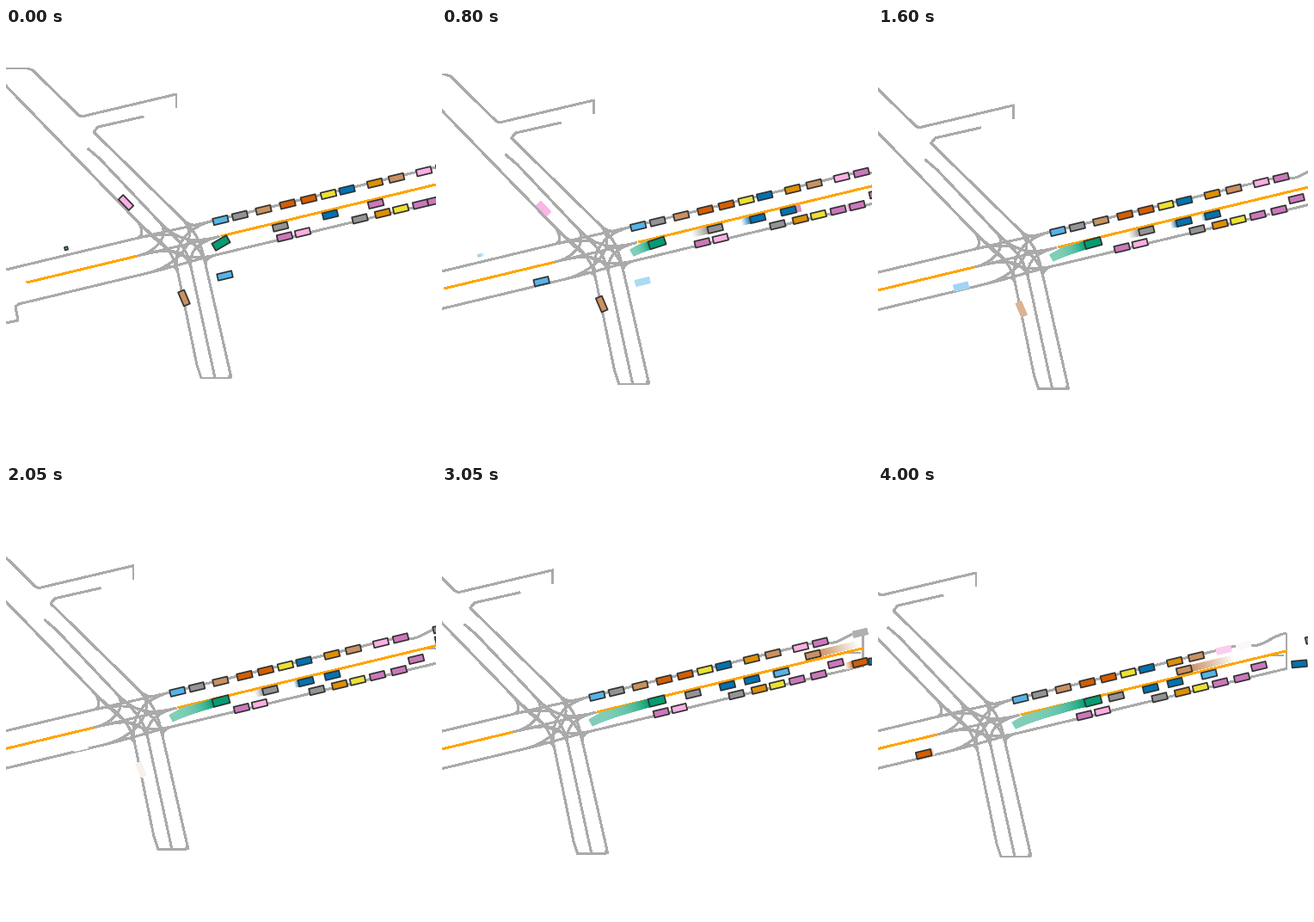
A matplotlib script for the animation above (4.05 s loop, 500 by 500 pixels).

```python
import numpy as np
import matplotlib.pyplot as plt
from matplotlib.animation import FuncAnimation
from matplotlib.collections import LineCollection, PolyCollection
from matplotlib.colors import to_rgb

SIZE, DPI, STEP, FRAMES = 500, 100, 0.05, 81
FADE = 0.8       # seconds until a trail has turned white
SLOPE = -0.24    # rise of the main road
TILT = np.degrees(np.arctan(SLOPE))
EDGE, ROAD, CENTER = "#333333", "#aaaaaa", "#ffa500"

BLUE, ORANGE, GREEN, RED, PURPLE = "#0173b2", "#de8f05", "#029e73", "#d55e00", "#cc78bc"
BROWN, PINK, GRAY, YELLOW, SKY = "#ca9161", "#fbafe4", "#949494", "#ece133", "#56b4e9"

# Lines parallel to the main road, named by their height at x = 400
NORTH, ONCOMING, MIDDLE, SOUTH = 187.4, 199.6, 211.6, 224.6


def on_lane(lane, x):
    return x, lane + SLOPE * (x - 400)


def lane_of(x, y):
    return y - SLOPE * (x - 400)


def stretch(lane, *xs):
    return [on_lane(lane, x) for x in xs]


def camera(t):
    return np.array([28 * t - 1.75 * t**2, -9.4 * t + 0.85 * t**2])


def hero(t):
    return box(camera(t) + 250, -14 - 16 * np.exp(-t / 0.6), (19.3, 9.3))


def box(center, angle, size):
    a = np.radians(angle)
    u = np.array([np.cos(a), np.sin(a)]) * size[0] / 2
    v = np.array([-np.sin(a), np.cos(a)]) * size[1] / 2
    c = np.asarray(center)
    return np.array([c - u - v, c + u - v, c + u + v, c - u + v])


def fade(color, alpha):
    return tuple(1 - alpha * (1 - c) for c in to_rgb(color))


class Car:
    """Rolls along a lane from x to stop, slowing down by the power ease."""

    def __init__(self, color, lane, x, stop=None, start=0, end=9, dur=1, ease=2,
                 angle=TILT, size=(17.4, 7.6)):
        self.color, self.lane, self.x = color, lane, x
        self.stop = x if stop is None else stop
        self.start, self.end, self.dur, self.ease = start, end, dur, ease
        self.angle, self.size = angle, size

    def alive(self, t):
        return self.start - 1e-6 <= t < self.end - 1e-6

    def shape(self, t):
        left = 1 - np.clip((t - self.start) / self.dur, 0, 1)
        x = self.stop + (self.x - self.stop) * left**self.ease
        return box(on_lane(self.lane, x), self.angle, self.size)

    def trail(self, t):
        if self.x == self.stop and self.alive(t):
            return
        for k in range(round(FADE / STEP), 0, -1):
            past = t - k * STEP
            if past >= -1e-6 and self.alive(past):
                yield self.shape(past), fade(self.color, 1 - k * STEP / FADE)


def row(lane, colors, xs):
    return [Car(c, lane, x) for c, x in zip(colors, xs)]


cars = [
    *row(NORTH, [SKY, GRAY, BROWN, RED, RED, YELLOW, BLUE, ORANGE, BROWN],
         [249.5, 272, 299.5, 327.5, 352, 375, 396.5, 429, 454]),
    Car(PINK, NORTH, 486, end=3.75),
    Car(PURPLE, NORTH, 509, end=3.3),
    Car(GRAY, NORTH, 555.5, end=2.9),
    *row(SOUTH, [PURPLE, PINK, GRAY, ORANGE, YELLOW, PURPLE],
         [324, 345, 411.5, 438, 459, 482]),
    Car(PURPLE, SOUTH, 499, 507, dur=2),
    Car(SKY, SOUTH, 137, start=0.8, end=1.3),
    Car(RED, SOUTH, 141, 137, start=3.2),
    Car(BLUE, SOUTH, 574, start=3, angle=-5),
    Car(GRAY, MIDDLE, 319, 361, dur=2.9),
    Car(BLUE, MIDDLE, 377, 401, dur=2.9),
    Car(PURPLE, MIDDLE, 430, end=0.7),
    Car(BLUE, MIDDLE, 423, 429.5, start=0.7),
    Car(SKY, MIDDLE, 462, 469, start=2.9),
    Car(BROWN, ONCOMING, 583, 440, start=1.6, dur=2.4, ease=0.93),
    Car(GRAY, ONCOMING, 590, start=3),
    Car(PURPLE, lane_of(527, 185.7), 527),
    Car(RED, lane_of(552, 185.5), 546, 556, start=2.3, end=3.15),
    Car(SKY, lane_of(254.5, 288), 254.5, end=0.45),
    Car(SKY, lane_of(70, 256.3), 70, 63.5, end=0.5, dur=0.5, ease=1, size=(3.4, 3.4)),
    Car(PINK, lane_of(139.5, 203), 139.5, end=0.8, angle=46),
    Car(BROWN, lane_of(207, 314), 207, end=1.4, angle=67),
]


def turn(p, dp, q, dq):
    """Smooth curve that leaves p along dp and reaches q along dq."""
    p, dp, q, dq = (np.array(v, float) for v in (p, dp, q, dq))
    reach = 0.45 * np.hypot(*(q - p))
    s = np.linspace(0, 1, 24)[:, None]
    a, b = p + reach * dp, q - reach * dq
    return (1 - s)**3 * p + 3 * s * (1 - s)**2 * a + 3 * s**2 * (1 - s) * b + s**3 * q


# Junction legs: direction inwards, then left, middle and right line ends
east = np.array([0.97, -0.235])
legs = [
    (east, on_lane(185, 152), on_lane(205.7, 155), on_lane(228.5, 165)),
    (-east, on_lane(226.5, 245), on_lane(206, 248), on_lane(186, 242)),
    (np.array([0.7, 0.72]), (205, 222), (178, 225), (152, 224)),
    (np.array([-0.22, -0.975]), (200, 285), (215.5, 280), (232.5, 277)),
]
west_leg, east_leg, hill_leg, south_leg = legs

curbs = [
    # north-west road and its side street
    [(-20, 47), (25, 47), (31, 49), (84, 101), (88, 103), (198, 77), (198, 93)],
    [(160, 103), (107, 115), (102, 121), hill_leg[1]],
    [(95, 140), (109, 152), hill_leg[2]],
    [(-10, 57), hill_leg[3]],
    # main road
    stretch(185, -10, 152),
    stretch(205.7, 152, 170),
    [(-5, 344), (14, 340), (11, 324), *stretch(228.5, 15, 165)],
    stretch(186, 242, 508),
    turn(on_lane(186, 508), (0.95, 0.3), (559, 147), (0.95, -0.2)),
    [(559, 147), *stretch(226.5, 559, 245)],
    [(537, 173.5), (556, 173.5)],
    # south road
    [south_leg[1], (222, 392), (227, 407), (259, 407), (261, 402)],
    [south_leg[2], (243, 407)],
    [south_leg[3], (262, 407)],
]
for i, (d1, _, mid1, right1) in enumerate(legs):
    for j, (d2, left2, mid2, _) in enumerate(legs):
        if i != j:
            curbs.append(turn(right1, d1, left2, -d2))
        if i < j:
            curbs.append(turn(mid1, d1, mid2, -d2))
dividers = [stretch(205.7, 24, 152), stretch(206, 250, 559)]


fig = plt.figure(figsize=(SIZE / DPI, SIZE / DPI), dpi=DPI, facecolor="white")
ax = fig.add_axes([0, 0, 1, 1])
ax.axis("off")
for lines, color in ((curbs, ROAD), (dividers, CENTER)):
    ax.add_collection(LineCollection(lines, colors=color, linewidths=1.35,
                                     antialiaseds=False, zorder=1))
trails = ax.add_collection(PolyCollection([], linewidths=0, zorder=3))
bodies = ax.add_collection(PolyCollection([], edgecolors=EDGE, linewidths=1.25, zorder=4))


def draw(frame):
    t = frame * STEP
    cx, cy = camera(t)
    ax.set_xlim(cx, cx + SIZE)
    ax.set_ylim(cy + SIZE, cy)

    ghosts = [g for car in cars for g in car.trail(t)]
    ghosts += [(hero(k * STEP), fade(GREEN, 0.5 + 0.5 * (k / frame)**2.5))
               for k in range(frame)]
    trails.set_verts([verts for verts, _ in ghosts])
    trails.set_facecolor([color for _, color in ghosts] or "none")

    live = [car for car in cars if car.alive(t)]
    bodies.set_verts([car.shape(t) for car in live] + [hero(t)])
    bodies.set_facecolor([car.color for car in live] + [GREEN])
    return trails, bodies


anim = FuncAnimation(fig, draw, frames=FRAMES, interval=50, repeat=True, repeat_delay=0,
                     blit=False)
plt.show()
```
